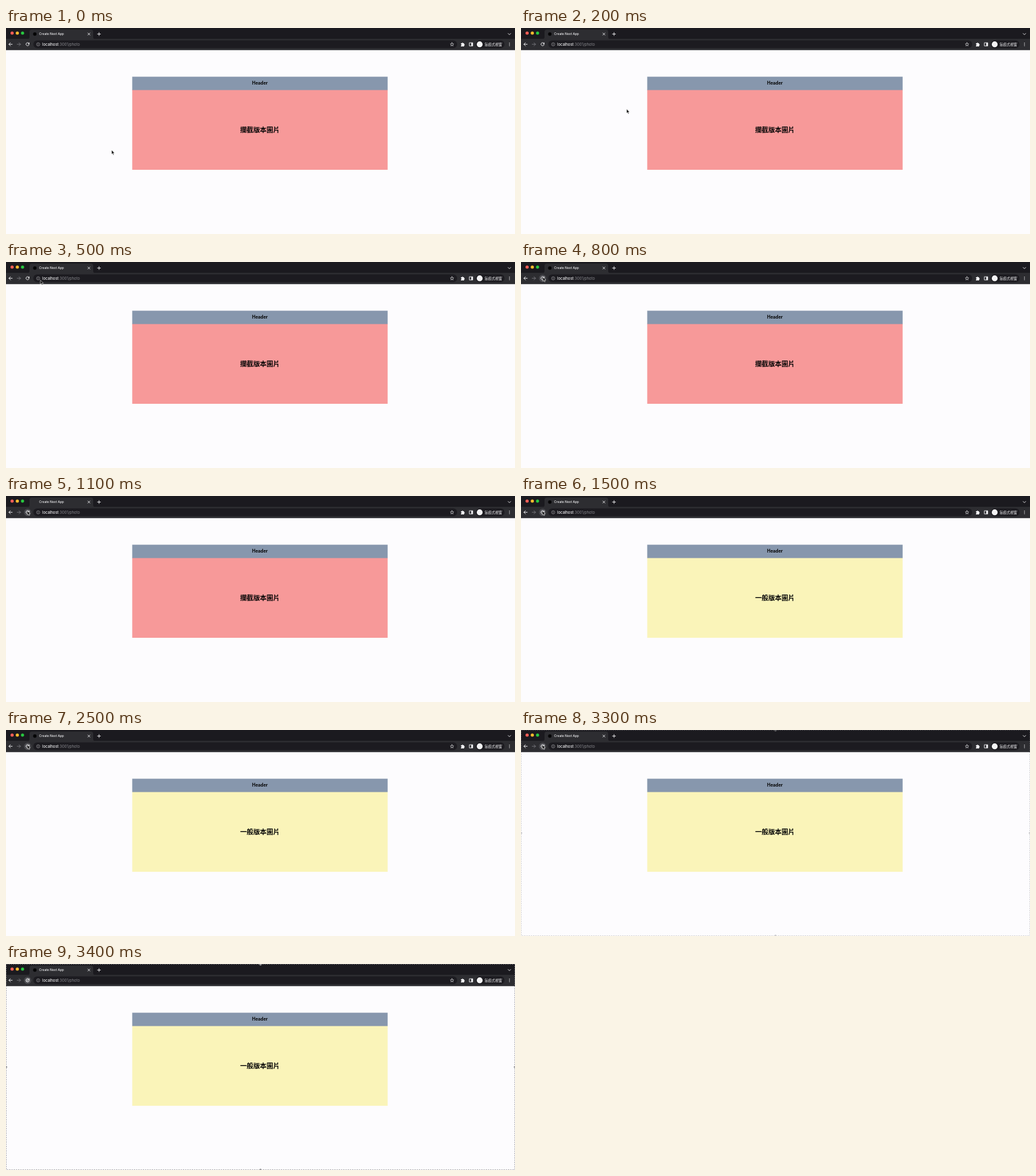
An HTML page that plays this animation: 800x324 px, repeating every 3500 ms.

```html
<!DOCTYPE html>
<html lang="zh-Hant">
<head>
<meta charset="utf-8">
<title>Photo route</title>
<style>
  html, body { margin: 0; width: 100%; height: 100%; overflow: hidden; background: #fdfcfe; }
  svg { display: block; width: 800px; height: 324px; }
  text { font-family: Inter, "Noto Sans CJK TC", "Noto Sans CJK", sans-serif; }
  .line { fill: none; stroke: #f1f1f3; stroke-width: .9; stroke-linecap: round; stroke-linejoin: round; }
  .dim { stroke: #77777c; }
  .ui { fill: #f1f1f3; font-weight: 500; }
  .bold { font-weight: 700; text-anchor: middle; fill: #050505; }
</style>
</head>
<body>
<svg viewBox="0 0 800 324">
  <rect width="800" height="324" fill="#fdfcfe"/>

  <!-- window and tab -->
  <rect width="800" height="17.5" fill="#1b1a1f"/>
  <rect y="17" width="800" height="17.6" fill="#2d2d31"/>
  <rect y="34" width="800" height=".7" fill="#434347"/>
  <path d="M34 17.2Q37 17.2 37 14V6Q37 2.5 40.5 2.5H133.5Q137 2.5 137 6V14Q137 17.2 140 17.2Z" fill="#2d2d31"/>
  <circle cx="9.6" cy="8" r="2.5" fill="#fe5f57"/>
  <circle cx="17.8" cy="8" r="2.5" fill="#febc2e"/>
  <circle cx="26" cy="8" r="2.5" fill="#28c840"/>
  <circle id="icon" cx="45.3" cy="9.5" r="2.7" fill="#050506"/>
  <text class="ui" x="52" y="11.4" font-size="4.95">Create Next App</text>
  <path class="line" d="M128.7 7.9l3.2 3.2m0-3.2l-3.2 3.2M143.8 9.5h4.8M146.2 7.1v4.8M789.2 8.6l2 2 2-2"/>

  <!-- toolbar -->
  <path class="line" d="M9.8 25.6H4.6M7 23.1l-2.5 2.5 2.5 2.5"/>
  <path class="line dim" d="M17.6 25.6h5.2M20.4 23.1l2.5 2.5-2.5 2.5"/>
  <circle id="hover" cx="34" cy="25.7" r="5.7" fill="#4b4b50"/>
  <path class="line" d="M36 24A2.5 2.5 0 1 0 36.3 26.5"/>
  <path d="M36.9 22.6v2.8h-2.8z" fill="#f1f1f3"/>
  <rect x="43" y="19.5" width="666" height="12.3" rx="6.15" fill="#1c1b20"/>
  <circle cx="50.6" cy="25.7" r="2.5" fill="none" stroke="#b4b4b8" stroke-width=".6"/>
  <path d="M50.6 25.3v1.7M50.6 24v.6" stroke="#b4b4b8" stroke-width=".6"/>
  <text class="ui" x="57" y="27.7" font-size="5.9">localhost<tspan fill="#8b8b90" font-weight="400">:3001/photo</tspan></text>
  <path id="star" class="line" style="stroke-width:.6"/>
  <path d="M715 24h1.5a1 1 0 1 1 2 0h1.5v1.5a1 1 0 1 1 0 2v1.4h-5v-1.4a1 1 0 0 0 0-2z" fill="#f1f1f3"/>
  <rect class="line" x="728.6" y="23.2" width="5" height="5"/>
  <rect x="731.2" y="23.2" width="2.4" height="5" fill="#f1f1f3"/>
  <rect x="738.5" y="19.5" width="45" height="12.3" rx="6.15" fill="#1c1b20"/>
  <circle cx="744.5" cy="25.7" r="4.6" fill="#f4f4f5"/>
  <text class="ui" x="752.3" y="27.7" font-size="5.5">無痕式視窗</text>
  <g fill="#f1f1f3">
    <circle cx="791.3" cy="23.6" r=".65"/><circle cx="791.3" cy="25.7" r=".65"/><circle cx="791.3" cy="27.8" r=".65"/>
  </g>

  <!-- page -->
  <rect id="photo" x="198.4" y="97" width="401.4" height="126"/>
  <rect x="198.4" y="76.6" width="401.4" height="21" fill="#8797ad"/>
  <text class="bold" x="399.1" y="89.4" font-size="6.9">Header</text>
  <text class="bold" id="label" x="399.1" y="163.9" font-size="10.4"></text>

  <g id="frame">
    <rect x=".5" y=".5" width="799" height="323" fill="none" stroke="#8c8c90" stroke-width=".7" stroke-dasharray="2 1.5"/>
    <g fill="#8c8c90" stroke="#f4f4f5" stroke-width=".4">
      <circle cx="400" cy=".6" r="1.5"/><circle cx="400" cy="323.2" r="1.5"/>
      <circle cx=".6" cy="162" r="1.5"/><circle cx="799.4" cy="162" r="1.5"/>
    </g>
  </g>
  <g id="target" fill="none" stroke="#f1f1f3" stroke-width=".7">
    <circle cx="34" cy="25.7" r="2.6" fill="#77777b"/>
    <path d="M31.6 28.1l4.8-4.8"/>
  </g>
  <path id="cursor" d="M0 0V6.6L1.5 5.2 2.6 7.7 3.7 7.2 2.6 4.8H4.7Z" fill="#0a0a0a" stroke="#fff" stroke-width=".55"/>
</svg>
<script>
  const LOOP = 3500, STEP = 100;
  const $ = id => document.getElementById(id);
  const set = (id, name, value) => $(id).setAttribute(name, value);
  const show = (id, on) => set(id, 'opacity', +on);

  // time, x, y: the pointer holds each place until the next
  const path = [
    [0, 166, 192], [100, 166, 158], [200, 166, 127.5], [400, 128, 82], [500, 54, 28.5],
    [600, 43, 26], [700, 37, 24.4], [800, 34.4, 23.6], [900, 33.4, 23.2]
  ];
  // time, radius of the tab icon while the page reloads
  const iconSizes = [[0, 2.7], [1000, 0], [1200, 1.1], [1300, 1.7], [1400, 2.3], [1500, 2.7]];
  const at = (table, t) => table.findLast(row => row[0] <= t);

  const star = Array.from({ length: 10 }, (_, i) => {
    const a = i * Math.PI / 5, r = i % 2 ? 1.35 : 2.9;
    return (701 + r * Math.sin(a)).toFixed(2) + ' ' + (25.9 - r * Math.cos(a)).toFixed(2);
  });
  set('star', 'd', 'M' + star.join('L') + 'Z');

  function draw(time) {
    const t = Math.floor(time % LOOP / STEP) * STEP;
    const [, x, y] = at(path, t);
    const reloaded = t >= 1200;
    set('cursor', 'transform', `translate(${x} ${y})`);
    set('icon', 'r', at(iconSizes, t)[1]);
    set('photo', 'fill', reloaded ? '#faf4b9' : '#f79999');
    $('label').textContent = reloaded ? '一般版本圖片' : '攔截版本圖片';
    show('hover', t >= 700);
    show('cursor', t < 3400);
    show('target', t >= 3400);
    set('frame', 'opacity', t >= 3400 ? 1 : t >= 3300 ? .5 : 0);
  }

  const start = performance.now();
  function tick() {
    draw(performance.now() - start);
    requestAnimationFrame(tick);
  }
  tick();
</script>
</body>
</html>
```
